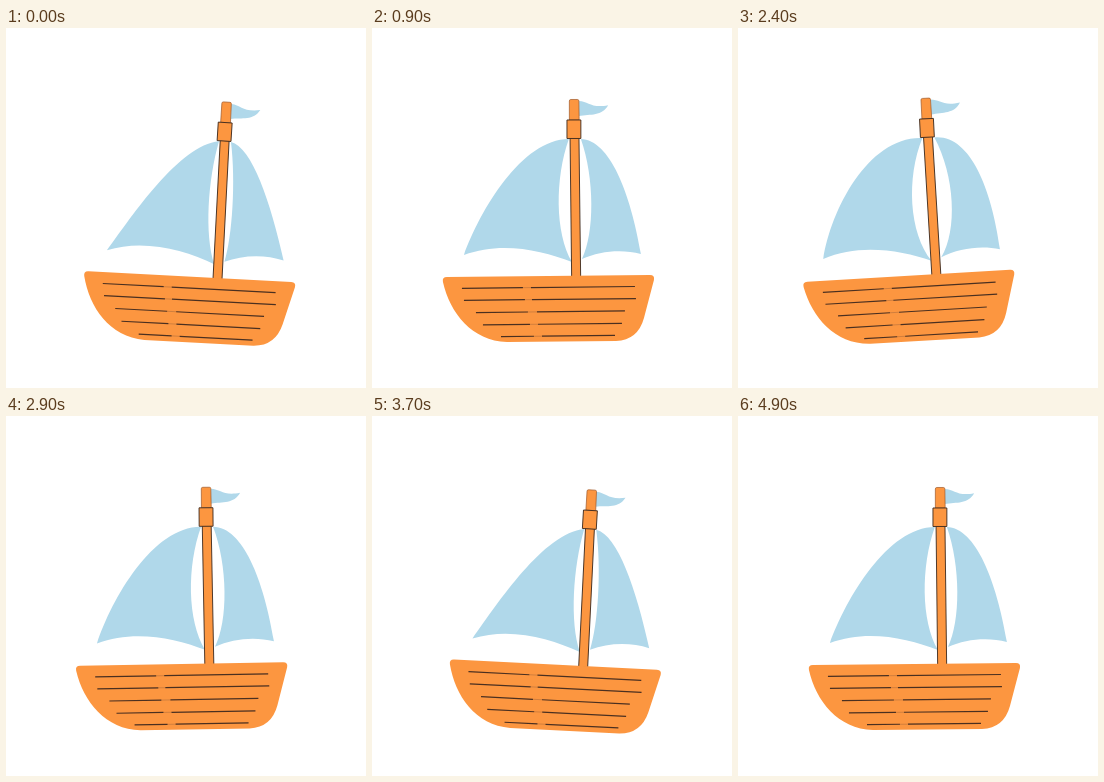
An HTML page that plays this animation: 360 px wide and 360 px high, repeating every 5 s.

```html
<!DOCTYPE html>
<html>
<head>
<meta charset="utf-8">
<title>Sailing boat</title>
<style>
html, body { margin: 0; height: 100%; overflow: hidden; background: #fff; }
svg { display: block; width: 100vw; height: 100vh; }
</style>
</head>
<body>
<svg viewBox="0 0 360 360">
  <g id="boat">
    <g fill="#b0d8ea">
      <path id="left"/>
      <path id="right"/>
      <path d="M207 73C217 73.5 219 80.5 236.3 77.3C230 88.5 219 86 207 88Z"/>
    </g>
    <g fill="#fc9640" stroke="#3d2a1e" stroke-width=".9">
      <path d="M197.5 92V73Q197.5 71.5 199 71.5H205.5Q207 71.5 207 73L207.3 92Z" stroke="#a05a2a" stroke-width=".7"/>
      <path d="M198.2 110H207.1L208.7 249H199.7Z"/>
      <path d="M195.1 92H209V110.5H195.1Z"/>
    </g>
    <path fill="#fc9640" d="M75 249L278 247Q283 247 282 252L272 290Q266 312 244 313L135 314C100 313 78 285 71 254Q70 249 75 249Z"/>
    <g id="planks" fill="none"/>
  </g>
</svg>
<script>
const $ = id => document.getElementById(id);
const LOOP = 5000, STEP = 100, SWAY = 4000;

// Planks: x start, gap start, gap end, x end, y
const planks = [
  [90, 151, 159, 263, 260.3], [92, 153, 160, 264, 272.3], [104, 156, 165, 253, 284.5],
  [111, 158, 166, 250, 296.8], [129, 162, 170, 243, 308.6]
];
$('planks').innerHTML = planks.map(([a, b, c, d, y]) => {
  const line = (x1, x2, color, width) =>
    `<path d="M${x1} ${y - (x1 - a) * .01}L${x2} ${y - (x2 - a) * .01}" stroke="${color}" stroke-width="${width}"/>`;
  return line(b, c, '#b5703c', .6) + line(a, b, '#4a2f20', 1.2) + line(c, d, '#4a2f20', 1.2);
}).join('');

function draw(ms) {
  const t = Math.floor(ms % LOOP / STEP) * STEP;
  const p = (t + 70) / SWAY * 2 * Math.PI;
  const angle = 3.65 * Math.cos(p) + .2 * Math.cos(2 * p) - .2 * Math.cos(3 * p) - .03;
  const k = angle / 3.4; // sails fill as the boat leans left
  $('boat').setAttribute('transform', `rotate(${angle} 170 366)`);
  $('left').setAttribute('d',
    `M92 227C${108 + 7 * k} ${183 + 7 * k} ${150 + 7 * k} ${111 + 6 * k} 197 111` +
    `C${183 + 5 * k} 150 ${183 + 5 * k} 205 200 234C170 222 128 213 92 227Z`);
  $('right').setAttribute('d',
    `M209 111C${238 - 7 * k} ${112 + 3 * k} ${258.5 - 6 * k} ${165 + 3 * k} 269 226` +
    `C250 221 228 223 210 231C${222.7 - 6 * k} 205 ${222.7 - 6 * k} 150 209 111Z`);
}

const start = performance.now();
function tick() {
  draw(performance.now() - start);
  requestAnimationFrame(tick);
}
tick();
</script>
</body>
</html>
```
